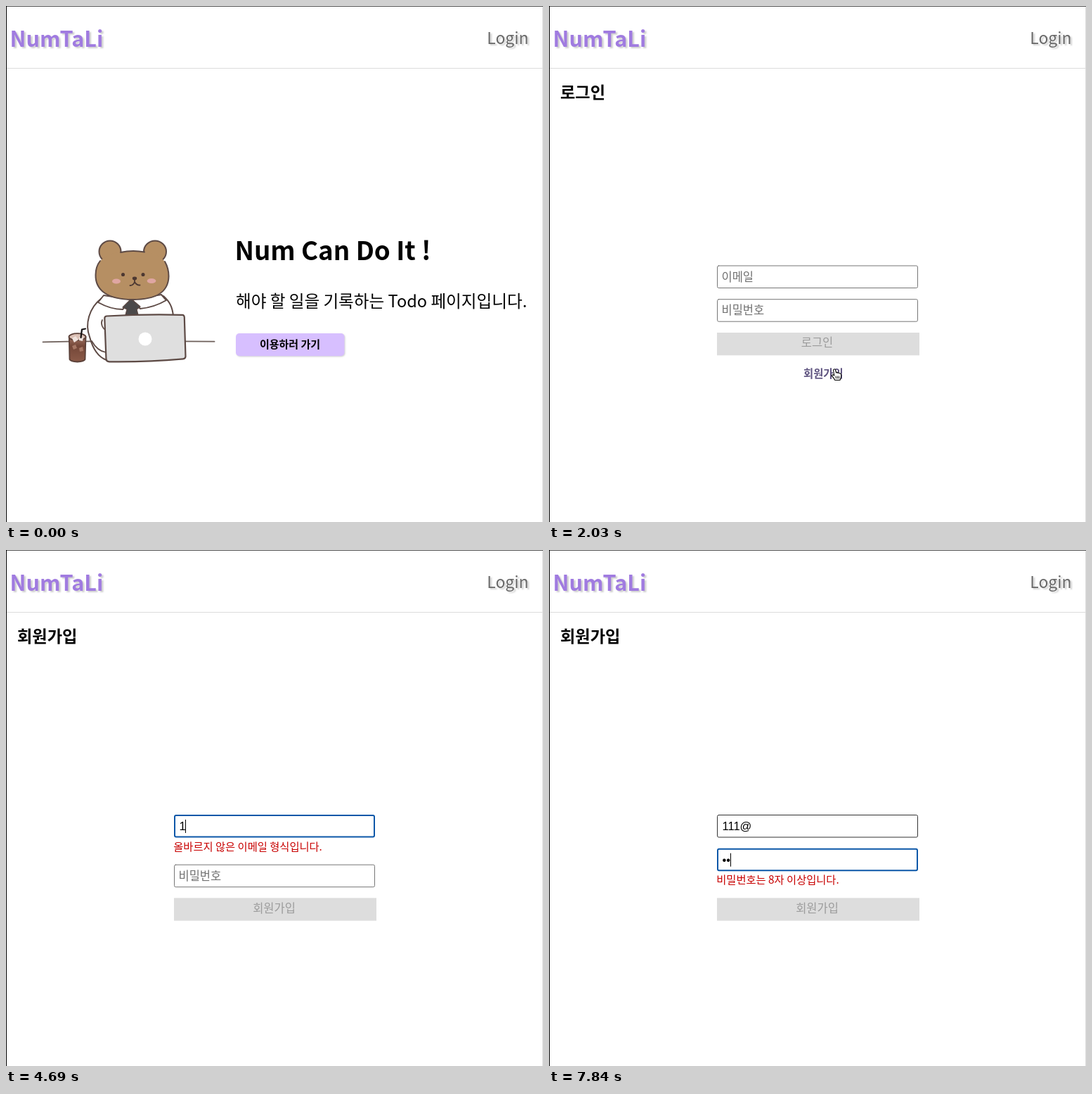
An HTML page with a canvas that plays this animation: 764x733 px, repeating every 8 s.

```html
<!DOCTYPE html>
<html lang="ko">
<head>
<meta charset="utf-8">
<title>Todo</title>
<style>
html, body { margin: 0; width: 100%; height: 100%; overflow: hidden; background: #fff; }
canvas { display: block; width: 764px; height: 733px; }
</style>
</head>
<body>
<canvas id="stage" width="764" height="733"></canvas>
<script>
const ctx = document.getElementById('stage').getContext('2d');
const LOOP = 8000, STEP = 70;
const KR = '"Noto Sans CJK KR", "Noto Sans CJK", "Noto Sans", sans-serif';
const LATIN = '"Liberation Sans", Arial, sans-serif';
const INK = '#5d4a45';

// Pointer path: time, x, y
const PATH = [
  [70, 709, 560], [350, 500, 496], [840, 424, 483], [1610, 423, 482],
  [1890, 345, 512], [2030, 406, 516], [2240, 404, 523], [2870, 404, 522],
  [3290, 365, 395], [3430, 365, 395], [3500, 365, 397]
];

function pointerAt(t) {
  const i = PATH.findIndex(p => p[0] > t);
  if (i < 0) return PATH[PATH.length - 1].slice(1);
  if (i === 0) return PATH[0].slice(1);
  const [t0, x0, y0] = PATH[i - 1], [t1, x1, y1] = PATH[i];
  const u = (t - t0) / (t1 - t0), k = u * u * (3 - 2 * u);
  return [x0 + (x1 - x0) * k, y0 + (y1 - y0) * k];
}

const inside = (p, x, y, w, h) => p[0] >= x && p[0] <= x + w && p[1] >= y && p[1] <= y + h;

function rect(x, y, w, h, color) {
  ctx.fillStyle = color;
  ctx.fillRect(x, y, w, h);
}

function text(s, x, y, size, color, { weight = 400, align = 'left', font = KR } = {}) {
  ctx.font = `${weight} ${size}px ${font}`;
  ctx.textAlign = align;
  ctx.fillStyle = color;
  ctx.fillText(s, x, y);
}

function shadow(dx, dy, blur, color) {
  ctx.shadowOffsetX = dx;
  ctx.shadowOffsetY = dy;
  ctx.shadowBlur = blur;
  ctx.shadowColor = color;
}
const noShadow = () => shadow(0, 0, 0, 'transparent');

function shape(d, fill, stroke, width = 2) {
  const p = new Path2D(d);
  if (fill) { ctx.fillStyle = fill; ctx.fill(p); }
  if (stroke) { ctx.strokeStyle = stroke; ctx.lineWidth = width; ctx.stroke(p); }
}

function oval(x, y, rx, ry, fill, stroke, width = 2) {
  ctx.beginPath();
  ctx.ellipse(x, y, rx, ry, 0, 0, Math.PI * 2);
  if (fill) { ctx.fillStyle = fill; ctx.fill(); }
  if (stroke) { ctx.strokeStyle = stroke; ctx.lineWidth = width; ctx.stroke(); }
}

function header() {
  rect(0, 0, 764, 733, '#fff');
  rect(0, 88, 764, 1, '#dcdcdc');
  rect(763, 0, 1, 733, '#dedede');
  rect(0, 0, 764, 1, '#555');
  rect(0, 0, 1, 733, '#000');
  shadow(2.5, 2.5, 2, '#d0d0d0');
  text('NumTaLi', 5.5, 57.5, 30.6, '#a07be0', { weight: 700 });
  text('Login', 684.3, 53.5, 22.9, '#686868');
  noShadow();
}

function cup() {
  const g = ctx.createLinearGradient(0, 468, 0, 506);
  g.addColorStop(0, '#a87a69');
  g.addColorStop(0.4, '#744738');
  g.addColorStop(1, '#8c5b49');
  shape('M89.8 470 L90.5 502 Q92 505 101.5 505.5 Q111 505 112.5 502 L113.5 470 Z', g, '#5a4038', 1.8);
  oval(101.5, 470, 12, 4.8, '#dcc1b6', '#5a4038', 1.8);
  shape('M94 472 L99 469 L103 474 L97 478 Z M104 470 L110 471 L109 476 L104 475 Z', '#efe2dc');
  shape('M94 483 L99 481 L101 486 L96 488 Z M104 486 L109 484 L110 490 L105 491 Z', '#a67764');
  shape('M106.5 471 L108 459.5 L113 458.5', null, '#171313', 2.2);
}

function bear() {
  ctx.lineCap = ctx.lineJoin = 'round';
  shape('M52.5 477.3 Q170 475.5 296.5 476.7', null, '#6d5f5a', 1.8);

  // Shirt, collar and tie
  shape('M136 414 C118 429 112 452 119 470 C124 489 132 499 143 503 L236 470 L238 440 C237 428 233 420 223 412 Z', '#fff');
  shape('M136 415 C118 429 112 452 119 470 C124 489 132 499 143 503 M224 412 C233 420 237 428 238 441', null, INK);
  shape('M122 476 Q130 490 142 492 M137 446 C134 452 138 458 141 460', null, INK, 1.7);
  shape('M139 411 L131 421 Q149 431 166 431 L178 417 Z M221 410 L228 418 Q211 428 191 430 L179 417 Z', '#fff', INK);
  shape('M178 416 L191 427 L186 431 L188 439 L170 439 L172 431 L166 428 Z', '#4b494a', INK, 1.2);

  // Head
  const fur = '#b68f63';
  oval(148, 349, 15.5, 15.5, fur, INK);
  oval(212, 349, 16, 15.5, fur, INK);
  shape('M150 352 C165 347 195 347 210 352 C226 357 231.5 370 231.5 384 C231 406 215 417 180 417 C145 417 127 404 127.5 382 C127.5 368 135 357 150 352 Z', fur);
  shape('M163 350 C174 347.5 187 347.5 197 349.5 M226 363 C230 370 231.5 377 231.5 384 C231 406 215 417 180 417 C145 417 127 404 127.5 382 C127.5 374 130 367 134 362', null, INK);
  oval(157, 391, 6, 3.6, '#dfa6a2');
  oval(207, 390.5, 6.3, 3.6, '#dfa6a2');
  oval(166.5, 381.5, 2.5, 2.6, '#4c3832');
  oval(195, 381.5, 2.5, 2.6, '#4c3832');
  oval(183, 387, 3.2, 2.4, '#4c3832');
  shape('M183 388 L183 392 Q181 397 176.5 397 M183 392 Q186 397 190.5 396.5', null, '#4c3832', 1.8);

  // Laptop
  shape('M143 440.5 Q196 437.5 251 438.8 Q253.5 439 253.8 442 L255.5 498 Q255 501 252 501.3 Q200 506 147 505.3 Q143 505 142.5 502 L140.3 444 Q140 441 143 440.5 Z', '#dfdfdf', INK, 2.2);
  oval(198, 473, 9.5, 9.5, '#fff');
  cup();
}

function hero(hover) {
  bear();
  text('Num Can Do It !', 325.5, 361, 36.7, '#000', { weight: 700 });
  text('해야 할 일을 기록하는 Todo 페이지입니다.', 327, 428, 23.6, '#000');
  shadow(1, 1, 2, '#d3d3d3');
  ctx.fillStyle = hover ? '#f8e9ff' : '#d7bfff';
  ctx.beginPath();
  ctx.roundRect(327, 465, 154.5, 32.3, 5);
  ctx.fill();
  noShadow();
  text('이용하러 가기', 404, 485.5, 15, '#000', { weight: 700, align: 'center' });
}

function field(y, { value = '', hint, focus, hover, caret }) {
  const w = focus ? 2 : 1;
  ctx.strokeStyle = focus ? '#0b57a8' : hover ? '#333' : '#767676';
  ctx.lineWidth = w;
  ctx.beginPath();
  ctx.roundRect(239 + w / 2, y + w / 2, 286 - w, 32.5 - w, 2);
  ctx.stroke();
  if (value) text(value, 246.5, y + 22, 16.5, '#000', { font: LATIN });
  else text(hint, 245.5, y + 22, 16.5, '#707070');
  if (caret) {
    ctx.font = `16.5px ${LATIN}`;
    rect(Math.round(246 + ctx.measureText(value).width), y + 7, 1, 19, '#000');
  }
}

function submit(label, y) {
  rect(239, y, 288, 32.3, '#dddddd');
  text(label, 381.5, y + 20.3, 16.5, '#9c9c9c', { align: 'center' });
}

const title = s => text(s, 16, 130.8, 23.2, '#000', { weight: 700 });
const warn = (s, y) => text(s, 238.3, y, 15.3, '#c80000');

function login() {
  title('로그인');
  field(368.5, { hint: '이메일' });
  field(416.2, { hint: '비밀번호' });
  submit('로그인', 464);
  text('회원가입', 390.3, 527.8, 15.4, '#5f5480', { weight: 700, align: 'center' });
}

function signup(t, p) {
  const email = '1'.repeat([4690, 5250, 5600].filter(k => t >= k).length) + (t >= 6090 ? '@' : '');
  const pass = '•'.repeat([7630, 7840].filter(k => t >= k).length);
  const badEmail = t >= 4690 && t < 6090;
  const badPass = t >= 7630;
  const onEmail = t >= 3640 && t < 7140, onPass = t >= 7140;
  const caretOff = (t >= 4200 && t < 4690) || (t >= 6650 && t < 7140);
  const top = badEmail || badPass ? 376 : 387.5;
  const second = top + (badEmail ? 70.7 : 47.7);

  title('회원가입');
  field(top, {
    value: email, hint: '이메일', focus: onEmail,
    hover: inside(p, 239, top, 286, 33), caret: onEmail && !caretOff
  });
  if (badEmail) warn('올바르지 않은 이메일 형식입니다.', 426.5);
  field(second, { value: pass, hint: '비밀번호', focus: onPass, caret: onPass });
  if (badPass) warn('비밀번호는 8자 이상입니다.', 474.2);
  submit('회원가입', badEmail || badPass ? 494.3 : 483);
}

const CURSORS = {
  arrow() {
    shape('M0 0 L0 14.5 L3.4 11.4 L5.7 16.7 L8 15.7 L5.7 10.6 L10.3 10.6 Z', '#000', '#fff', 1);
  },
  hand() {
    shape('M-1.5 1 Q0 -1.5 1.6 1 L2.6 5 Q4 3.6 5 5.4 Q6.6 4.4 7.6 6 Q9.6 5.6 9.8 8 L9.4 11.5 L8 15.5 L0.8 15.5 Q-0.5 12.5 -3.6 9.5 Q-3.8 7.4 -1.6 8 L-0.2 9 Z', '#fff', '#000', 1.1);
    shape('M2 10 L2.4 13 M4.3 10 L4.5 13 M6.6 10 L6.5 13', null, '#000', 0.9);
  },
  beam() {
    shape('M-3.5 -8 Q0 -8 0 -6 Q0 -8 3.5 -8 M0 -6 L0 6 M-3.5 8 Q0 8 0 6 Q0 8 3.5 8 M-2 2 L2 2', null, '#000', 1.2);
  }
};

function pointer(kind, p) {
  ctx.save();
  ctx.translate(p[0], p[1]);
  CURSORS[kind]();
  ctx.restore();
}

function draw(t) {
  const p = pointerAt(t);
  let kind = 'arrow';
  header();
  if (t < 1400) {
    const hover = t >= 70 && inside(p, 327, 465, 155, 33);
    hero(hover);
    if (hover) kind = 'hand';
  } else if (t < 2730) {
    login();
    if (inside(p, 362, 511, 56, 22)) kind = 'hand';
  } else {
    signup(t, p);
    if (inside(p, 239, 387, 286, 33) || inside(p, 239, 435, 286, 33)) kind = 'beam';
  }
  if (t >= 70 && t < 3640) pointer(kind, p);
  const pressed = (t >= 910 && t < 1400) || (t >= 2660 && t < 2730);
  if (pressed) oval(p[0] + 0.5, p[1] - 0.4, 27.2, 27.2, null, '#000', 2.6);
}

const start = performance.now();
function tick() {
  const t = (performance.now() - start) % LOOP;
  draw(Math.floor(t / STEP) * STEP);
  requestAnimationFrame(tick);
}
tick();
</script>
</body>
</html>
```
